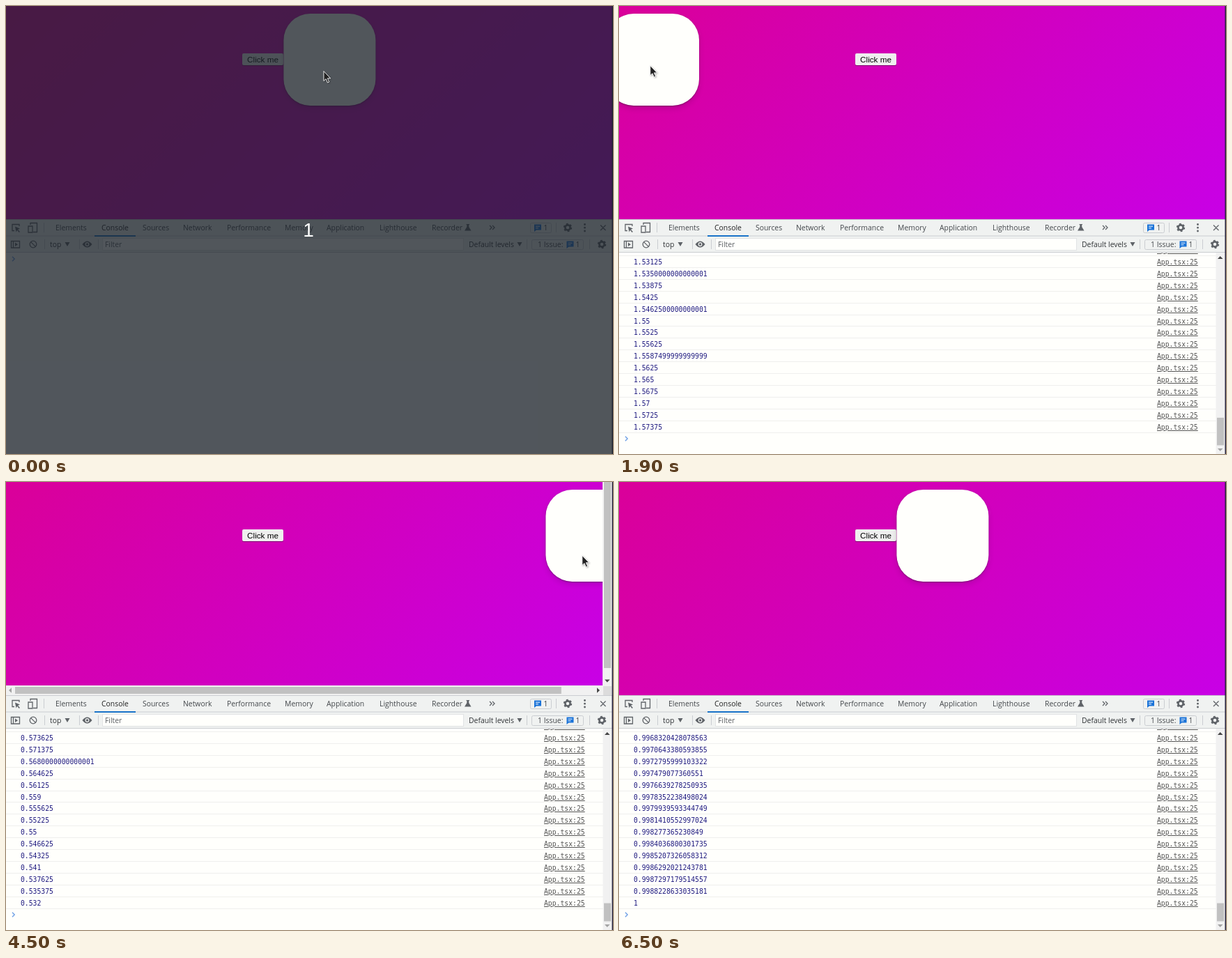
An HTML page that plays this animation: 871 by 643 pixels, repeating every 7300 ms.

```html
<!DOCTYPE html>
<html lang="en">
<head>
<meta charset="utf-8">
<title>Drag demo</title>
<style>
  html, body { margin: 0; width: 100%; height: 100%; overflow: hidden; }
  #stage { position: relative; width: 871px; height: 643px; overflow: hidden; background: #fffffc; }
  #stage > *, #page > *, #log > * { position: absolute; }
  #page { left: 0; top: 0; overflow: hidden; background: linear-gradient(135deg, #da0099, #c800e6); }
  #button { left: 339px; top: 68px; width: 59px; height: 16.5px; border-radius: 2px; background: #efefef;
    box-shadow: 0 1px 1px rgba(0,0,0,.4); text-align: center; white-space: nowrap;
    font: 11.7px/17px "Liberation Sans", Arial, sans-serif; }
  #box { left: 0; top: 10.6px; width: 132px; height: 132px; border-radius: 38px; background: #fffffc;
    box-shadow: 0 1px 2px rgba(0,0,0,.35), 0 4px 9px rgba(0,0,0,.13); }
  #log { left: 0; top: 354px; width: 857px; height: 289px; overflow: hidden; }
  .row { left: 0; width: 857px; height: 16.9px; box-sizing: border-box; border-bottom: 1px solid #efefed;
    font: 9.75px/17.4px "DejaVu Sans Mono", monospace; color: #1f1a80; }
  .row span { position: absolute; left: 21px; }
  .row u { position: absolute; left: 772px; color: #545454; }
  #prompt { left: 7px; width: 8px; height: 8px; }
  svg { overflow: visible; }
  #chrome { left: 0; top: 0; font: 10.4px "Open Sans", "Noto Sans", sans-serif; fill: #43474b; }
  .line { fill: none; stroke: #5f6368; stroke-width: 1.3; }
  .icon { fill: #5f6368; }
  .rule { fill: none; stroke: #cacdd1; }
  .track { fill: #f1f1f1; }
  .thumb { fill: #c1c1c1; }
  .dark { fill: #454545; }
  .pale { fill: #a3a3a3; }
  #dim { inset: 0; background: rgba(28,34,43,.765); }
  #dim span { position: absolute; left: 0; width: 868px; top: 302px; text-align: center; color: #fff;
    font: 28px/40px "Liberation Sans", Arial, sans-serif; }
  #cursor { left: 0; top: 0; filter: drop-shadow(1px 1px 1px rgba(0,0,0,.3)); }
</style>
</head>
<body>
<div id="stage">
  <div id="page"><div id="button">Click me</div><div id="box"></div></div>
  <div id="log">
    <svg id="prompt"><path d="M2 .8 5.2 4 2 7.2" fill="none" stroke="#6fa0e6" stroke-width="1.4"/></svg>
  </div>
  <svg id="chrome" width="871" height="643">
    <defs>
      <g id="gear">
        <circle r="3.6" fill="none" stroke="#5f6368" stroke-width="2.6"/>
        <circle r="5.2" fill="none" stroke="#5f6368" stroke-width="2" stroke-dasharray="2.7 2.745"/>
      </g>
      <g id="note">
        <path d="M0 0H10V8H3L0 10.5Z" fill="#1a73d8"/>
        <path d="M2 2.7H8M2 5.3H6" stroke="#fff"/>
      </g>
    </defs>

    <rect y="306" width="870" height="48" fill="#f0f2f1"/>
    <path class="rule" d="M0 306.5H870M0 330H870M0 353.5H870M54.5 311V325M789.5 311V325M55.5 335V349M105.5 335V349M132.5 335V349M747.5 335V349M837.5 335V349"/>
    <rect x="127" y="329" width="59" height="2" fill="#1a73c8"/>
    <rect x="138.5" y="333.5" width="518" height="17" fill="#fffffc" stroke="#e1e3e4"/>
    <g id="tabs"></g>
    <g fill="#303336">
      <text x="63" y="346">top</text>
      <text x="664" y="346">Default levels</text>
      <text x="142" y="346" fill="#5c6064">Filter</text>
    </g>
    <path class="icon" d="M84.5 339h7L88 345ZM733.5 339h7L737 345Z"/>
    <path class="icon" d="M660.5 313H665v1h-.8v3l3.3 5.5H658l3.3-5.5v-3h-.8Z"/>
    <path class="line" d="M694 315l3 3-3 3M698 315l3 3-3 3M853 314.5l7.5 7.5M860.5 314.500l-7.5 7.5"/>
    <g class="icon"><circle cx="830.5" cy="313.5" r="1.4"/><circle cx="830.5" cy="318.2" r="1.4"/><circle cx="830.5" cy="323" r="1.4"/></g>

    <path class="line" d="M12 322.5H9v-9H19V316"/>
    <path class="icon" d="M13 316.5l7 3-3 1.2 3 3.3-1.3 1-2.7-3.2-1.5 2.7Z"/>
    <path class="line" d="M35 314v-2.500h9.5v13H39M32 316h6v9h-6Z"/>
    <path class="line" d="M7.5 337.5h12V347h-12ZM10.5 337.5V347"/>
    <path class="icon" d="M13 339.5l4 2.7-4 2.800Z"/>
    <circle class="line" cx="39" cy="342" r="4.8"/><path class="line" d="M35.6 338.6l6.8 6.800"/>
    <path class="icon" d="M109.5 342q7-9 14 0q-7 9-14 0Z"/>
    <circle cx="116.5" cy="342" r="2.3" fill="#5f6368" stroke="#f0f2f1" stroke-width="1.2"/>
    <use href="#gear" x="806" y="318"/><use href="#gear" x="855" y="342"/>

    <rect class="rule" x="752.5" y="311.5" width="30" height="14" rx="2"/>
    <use href="#note" x="758" y="313.5"/><text x="771.5" y="322">1</text>
    <rect class="rule" x="754.5" y="335.5" width="74" height="14" rx="2"/>
    <text x="763" y="346">1 Issue:</text>
    <use href="#note" x="804.5" y="337.5"/><text x="817.5" y="346">1</text>

    <g id="logScroll">
      <rect class="track" x="856.5" y="354" width="12.5" height="289"/>
      <rect class="thumb" id="logThumb" x="858" width="10"/>
      <path class="dark" d="M859 363h7.5l-3.8-4Z"/>
      <path class="pale" d="M859 635h7.5l-3.8 4Z"/>
    </g>
    <g id="pageScroll">
      <path class="track" d="M856 0H869V306H0V292H856Z"/>
      <rect x="857" y="293" width="12" height="13" fill="#dcdcdc"/>
      <rect class="thumb" x="858" width="10" height="267"/>
      <rect class="thumb" id="pageThumb" x="13" y="294" height="10"/>
      <path class="dark" d="M859 283.5h7.5l-3.8 4ZM848 295.3v7.4l4-3.7Z"/>
      <path class="pale" d="M8 295.3v7.4l-4-3.7Z"/>
    </g>
    <rect x="869.5" width="1.5" height="643" fill="#26233c"/>
  </svg>
  <div id="dim"><span>1</span></div>
  <svg id="cursor" width="12" height="18">
    <path d="M.5 .5v14l3.2-2.8L6 17l2.300-1L6 10.800h4.300Z" fill="#222" stroke="#fff" stroke-width=".9"/>
  </svg>
</div>
<script>
const $ = id => document.getElementById(id);
const LOOP = 7300, TICK = 100, ROW = 16.9, BOX = 132;
const DRAG_PERIOD = 15, SPRING_PERIOD = 13, RELEASE = 5385;
const CURSOR_OFFSET = 57, CURSOR_LAG = 40;

const glide = u => .6 * u * u * (3 - 2 * u) + .4 * u;
const flick = u => 1 - (1 - u) ** 1.5;
const mix = (a, b, u) => a + (b - a) * u;

// Each move eases from the pose before it: box left, logged value, cursor height.
const home = { left: 398.4, value: 1, y: 93 };
const moves = [
  { start: 200, end: 1900, ease: glide, left: -17, value: 1.575, y: 85 },
  { start: 1900, end: 2400, ease: flick, left: -85, value: 1.6475, y: 97 },
  { start: 3040, end: 3900, ease: flick, left: 682, value: .6636, y: 105 },
  { start: 3900, end: 5100, ease: flick, left: 825, value: .4578, y: 105 }
];
const held = moves.at(-1);

function dragPose(time) {
  const i = moves.findLastIndex(move => move.start <= time);
  if (i < 0) return home;
  const from = moves[i - 1] ?? home, to = moves[i];
  const u = to.ease(Math.min(1, (time - to.start) / (to.end - to.start)));
  return { left: mix(from.left, to.left, u), value: mix(from.value, to.value, u), y: mix(from.y, to.y, u) };
}

// Overdamped spring, stiffness 200 and damping 40, that snaps home once it is close.
function springPose(time) {
  const s = (time - RELEASE) / 1000, slow = 5.858, fast = 34.142;
  const away = (fast * Math.exp(-slow * s) - slow * Math.exp(-fast * s)) / (fast - slow);
  const value = mix(1, held.value, away);
  return 1 - value < .0011 ? home : { left: mix(home.left, held.left, away), value };
}

// A dragged value moves in whole pixel steps, wider to the left of home than to the right.
function snap(value) {
  const step = value > 1 ? .00125 : .001125;
  return 1 + Math.round((value - 1) / step) * step;
}

const log = [];
function record(time, value) {
  if (value !== (log.at(-1)?.value ?? 1)) log.push({ time, value });
}
for (let t = 200; t <= held.end; t += DRAG_PERIOD) record(t, snap(dragPose(t).value));
for (let t = RELEASE; log.at(-1).value < 1; t += SPRING_PERIOD) record(t, springPose(t).value);
const settled = log.at(-1).time;

const tabs = [[71, "Elements"], [137, "Console"], [196, "Sources"], [254, "Network"], [317, "Performance"],
  [400, "Memory"], [460, "Application"], [536, "Lighthouse"], [611, "Recorder"]];
$("tabs").innerHTML = tabs.map(([x, name]) =>
  `<text x="${x}" y="321.5"${name === "Console" ? ' fill="#222"' : ""}>${name}</text>`).join("");

const rows = Array.from({ length: 17 }, () => {
  const row = document.createElement("div");
  row.className = "row";
  row.innerHTML = "<span></span><u>App.tsx:25</u>";
  $("log").append(row);
  return row;
});

const show = (id, on) => { $(id).style.display = on ? "" : "none"; };

function drawLog(count) {
  const promptY = Math.min(9 + ROW * count, 267);
  $("prompt").style.top = promptY - 4 + "px";
  rows.forEach((row, i) => {
    const line = log[count - 1 - i];
    row.style.display = line ? "" : "none";
    row.style.top = promptY - ROW * (i + 1.5) + "px";
    row.firstChild.textContent = line?.value ?? "";
  });
  const height = Math.max(26, 264 * 289 / (ROW * (count + 1)));
  show("logScroll", count > 16);
  $("logThumb").setAttribute("y", 630.5 - height);
  $("logThumb").setAttribute("height", height);
}

function draw(time) {
  const drag = dragPose(time), pointer = dragPose(time - CURSOR_LAG);
  const { left } = time < RELEASE ? drag : springPose(time);
  // The page keeps its scrollbars until the spring has come to rest.
  const right = drag.left + BOX;
  const scrolls = right > 870 && time < settled;
  $("page").style.width = (scrolls ? 856 : 870) + "px";
  $("page").style.height = (scrolls ? 292 : 306) + "px";
  $("box").style.transform = `translateX(${left}px)`;
  $("cursor").style.transform = `translate(${pointer.left + CURSOR_OFFSET}px, ${pointer.y}px)`;
  show("pageScroll", scrolls);
  $("pageThumb").setAttribute("width", 831 * 855 / Math.max(right, 857));
  show("dim", time < 200);
  drawLog(log.filter(line => line.time <= time).length);
}

function frame() {
  const time = performance.now() % LOOP;
  draw(Math.floor(time / TICK) * TICK);
  requestAnimationFrame(frame);
}
frame();
</script>
</body>
</html>
```
